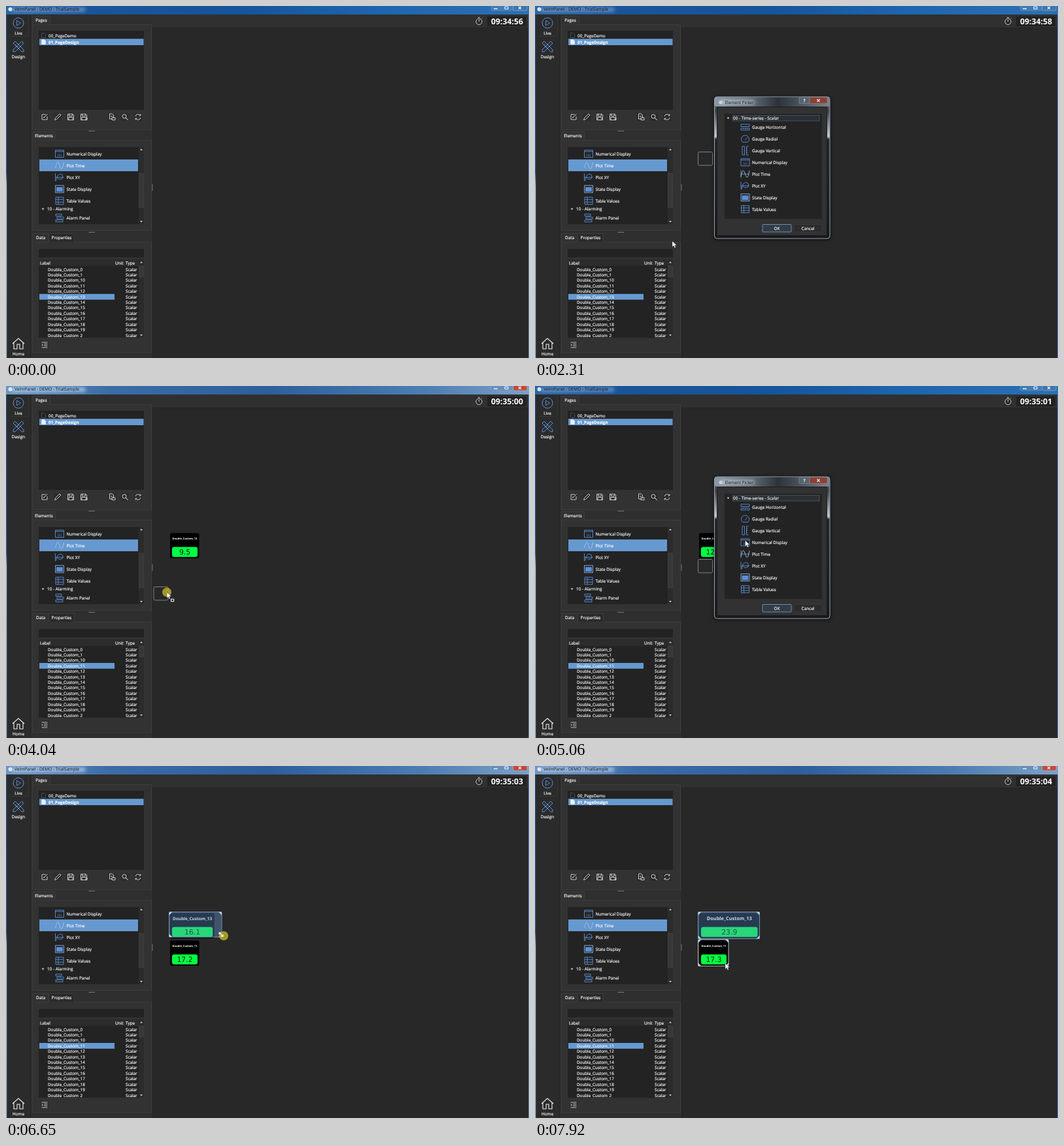
Animation of 800 by 539 pixels, one loop 7990 ms. Source, as an HTML page:

```html
<!DOCTYPE html>
<html lang="en">
<head>
<meta charset="utf-8">
<title>Dashboard designer</title>
<style>
  html, body { margin: 0; width: 100%; height: 100%; overflow: hidden; background: #282828; }
  svg { display: block; width: 800px; height: 539px; text-rendering: geometricPrecision; }
  text {
    font-family: "Open Sans", "Noto Sans", sans-serif; font-size: 6.4px; white-space: pre;
    fill: #fff; stroke: #fff; stroke-width: .16px;
  }
  .plain { stroke: none; }
  .value { font-family: "DejaVu Sans", sans-serif; font-size: 10.8px; fill: #0a1a0c; stroke: none; }
</style>
</head>
<body>
<svg id="stage" viewBox="0 0 800 539"></svg>
<script>
const LOOP = 7990;
const BLUE = '#6699d0', LINE = '#5c8fd6', LIST = '#232323', PANEL = '#323232', EDGE = '#3c3c3c';

// ---- drawing helpers ----
const rect = (x, y, w, h, fill, more = '') =>
  `<rect x="${x}" y="${y}" width="${w}" height="${h}" fill="${fill}" ${more}/>`;
const text = (x, y, s, more = '') => `<text x="${x}" y="${y}" ${more}>${s}</text>`;
const mid = (x, y, s, more = '') => text(x, y, s, 'text-anchor="middle" ' + more);
const path = (d, stroke = LINE, w = .9, fill = 'none') =>
  `<path d="${d}" fill="${fill}" stroke="${stroke}" stroke-width="${w}"/>`;
const at = (x, y, s) => `<g transform="translate(${x} ${y})">${s}</g>`;
const grad = (id, dir, ...stops) =>
  `<linearGradient id="${id}" x1="0" y1="0" x2="${dir === 'h' ? 1 : 0}" y2="${dir === 'h' ? 0 : 1}">` +
  stops.map(([o, c]) => `<stop offset="${o}" stop-color="${c}"/>`).join('') + '</linearGradient>';

const icons = {
  num: path('M-6.5-5.5h13v11h-13zM-6.5-3.5h13') +
    mid(0, 3.5, '(x)', `class="plain" style="font-size:5.5px;fill:${LINE}"`),
  time: path('M-6.5-6v12M-6.5 0h13') + path('M-6.5 4C-4-9-2-6 0 0S4 9 6.5-5', '#a9c4e6'),
  xy: path('M-6.5-6v12M-6.5 0h13') + path('M-5 5C-5-1-2-5 1-5A4 4 0 0 1 1 3C-1 3-3 2-3 0'),
  state: path('M-6.5-5.5h13v11h-13z', '#8db4e4') + rect(-5, -3, 10, 7, LINE),
  table: path('M-6-5.5h12v11h-12zM-6-2h12M-6 2h12M-2-5.5v11'),
  alarm: path('M-6-6h9v3h-9zM-4-1.5h10v3h-10zM-6 3h11v3h-11z'),
  gaugeH: path('M-6.5-4.5h13v3.5h-13zM-6.5 1.5h13v3h-13zM-3 1.5v1.5M0 1.5v1.5M3 1.5v1.5'),
  gaugeR: path('M-4 5A6 6 0 1 1 4 5zM0 2L3-2'),
  gaugeV: path('M-4.5-6.5h3.5v13h-3.5zM5-6.5h-3v13h3M2-3h1.5M2 0h1.5M2 3h1.5')
};
const item = (kind, x, y, label) => at(x, y, icons[kind]) + text(x + 10.5, y + 2.4, label);

const tab = (x, y, w, label, on = true) =>
  path(`M${x} ${y + 13.5}v-13h${w}v13`, EDGE, 1, on ? PANEL : '#2a2a2a') + mid(x + w / 2, y + 9.3, label);
const scroll = (y, h, ty, th) =>
  rect(203, y, 8, h, '#2b2b2b') + rect(203.5, ty, 7, th, '#383838', 'stroke="#484848" stroke-width=".6"') +
  path(`M205 ${y + 5}l2-2.4 2 2.4zM205 ${y + h - 5}l2 2.4 2-2.4z`, 'none', 0, '#c8c8c8');
const tool = (x, y, d) =>
  rect(x - 7, y - 7, 14, 14, '#2c2c2c', `rx="1.5" stroke="${EDGE}" stroke-width=".7"`) +
  at(x, y, path(d, '#dedede'));

// ---- main window ----
const titleBar = (fill, close, alpha) =>
  rect(0, 0, 800, 13, `url(#${fill})`) +
  rect(8, 2, 114, 7, '#d5e6f7', `rx="4" opacity="${alpha}" filter="url(#glow)"`) +
  rect(742, -2, 34, 9, '#5f8ab8', 'rx="2" opacity=".5" stroke="#a9c4de" stroke-width=".5"') +
  rect(776, -2, 21, 9, close, 'rx="2" stroke="#a9c4de" stroke-width=".5"') +
  path('M746 4.2h6', '#fff', 1.3) + path('M763 1.2h5v3.4h-5z', '#fff', 1) +
  path('M784 .8l4 4m0-4l-4 4', '#fff', 1.2);

const names = ['0', '1', '10', '11', '12', '13', '14', '15', '16', '17', '18', '19', '2'];
const rowY = i => 403 + i * 8.42;

function windowArt() {
  let s = rect(0, 13, 800, 526, '#282828') + rect(0, 13, 800, 20, '#303030') +
    rect(0, 13, 38, 526, '#2b2b2b') + rect(38, 13, 186, 526, '#2f2f2f') +
    path('M37.5 13v526M224.5 33.5v506M224.5 33.5H800', '#242424', 1) + path('M5 46.5h29M34.5 14v32', '#383838', .8);

  s += `<circle cx="19" cy="26" r="8" fill="none" stroke="${LINE}"/>` + path('M16.5 22.2v7.6l6-3.8z') +
    mid(19, 43.6, 'Live') +
    at(19, 62, path('M-8-5l3-3L8 5l0 3-3 0zM5-8l3 3L-5 8h-3v-3zM-5-2l1.5-1.5M-2 1L-.5-.5', LINE, 1)) +
    mid(19, 79.6, 'Design') +
    at(19, 517, path('M-9 0L0-8l9 8M-7-1.5V8h5V1h4v7h5v-9.5', '#f0f0f0', 1.1)) + mid(19, 535.2, 'Home');

  s += rect(716, 16, 15, 15, '#2c2c2c', `rx="1.5" stroke="${EDGE}" stroke-width=".7"`) +
    at(723.5, 24, '<circle r="4.6" fill="none" stroke="#dedede" stroke-width=".9"/>' +
      path('M0-3V0M-1.5-6.3h3M3.5-4.5l1.2-1.2', '#dedede')) +
    rect(736, 16, 60, 15, '#222', 'rx="1"');

  s += rect(40.5, 28.5, 182, 161, PANEL, `stroke="${EDGE}"`) + tab(40.5, 15, 27, 'Pages') +
    rect(50, 38, 161, 121, LIST) + rect(51, 50.2, 159.5, 9.8, BLUE) +
    path('M54.5 41.5h4l2 2v5h-6z', '#46566a', .8) + path('M54.5 51.5h4l2 2v5h-6z', '#fff', .5, '#e8f0fa') +
    text(65, 47.5, '00_PageDemo') + text(65, 57.6, '01_PageDesign', 'font-weight="700"');
  const disk = 'M-4.5-4.5h8l1 1v8h-9zM-2.5-4.5v3h5v-3M-3 4.5v-4h6v4';
  s += tool(59, 170, 'M2-4h-6v8h8v-5M-1 1L4.5-4.5M-1.5 1.5l.5-2') +
    tool(79, 170, 'M-4.5 4.5l1-3L3-5l2 2-6.5 6.5z') + tool(99, 170, disk) +
    tool(119, 170, disk + 'M1 4.5h4v-4') +
    tool(162, 170, 'M-3.5-5h4l2 2v5M-3.5-5v8h4M0 1h5v3.5h-5zM-2-1h3') +
    tool(182, 170, 'M-4-1a3 3 0 1 1 6 0a3 3 0 1 1-6 0M1 1.2L4.5 4.7M1.3 1.5L4.7 4.4') +
    tool(202, 170, 'M-4-1A4.2 4.2 0 0 1 3.6-2.4M4-4.5v2.4h-2.4M4 1A4.2 4.2 0 0 1-3.6 2.4M-4 4.5v-2.4h2.4') +
    path('M126.5 191.5h9.5M126.5 346.5h9.5M224 273v10', '#777', 1);

  s += rect(40.5, 205.5, 182, 138, PANEL, `stroke="${EDGE}"`) + tab(40.5, 192, 35, 'Elements') +
    rect(50, 216, 161, 118, LIST) + rect(51, 235, 151, 18, BLUE) + scroll(216, 118, 256, 53);
  [['num', 'Numerical Display'], ['time', 'Plot Time'], ['xy', 'Plot XY'], ['state', 'State Display'],
    ['table', 'Table Values']].forEach(([k, label], i) => s += item(k, 82, 226.3 + i * 18, label));
  s += path('M54.5 309.8h4l-2 2.6z', 'none', 0, '#ccc') + text(63, 313.4, '10 - Alarming') +
    item('alarm', 82, 324.6, 'Alarm Panel');

  s += rect(40.5, 361.5, 182, 169, PANEL, `stroke="${EDGE}"`) + tab(40.5, 348, 25, 'Data') +
    tab(65.5, 348, 39, 'Properties', false) + rect(50, 372, 161, 13, LIST, 'rx="1"') +
    rect(50, 388.5, 161, 119.5, LIST) + rect(50, 388.5, 153, 9.5, '#2c2c2c') +
    text(52, 396, 'Label') + text(167, 396, 'Unit') + text(183, 396, 'Type') + scroll(388.5, 119.5, 398, 17) +
    rect(51, 0, 115, 8.8, BLUE, 'id="pick"') + '<g clip-path="url(#rows)">' +
    names.map((n, i) => text(64, rowY(i) + 2.5, 'Double_Custom_' + n, 'style="font-size:6.3px"') +
      text(183, rowY(i) + 2.5, 'Scalar', 'style="font-size:6.3px"')).join('') + '</g>' +
    tool(59, 519, 'M-4.5-4h9M-1-1.3h5.5M-1 1.3h5.5M-4.5 4h9M-4.5-1.5l2 1.5-2 1.5');
  return s;
}

// ---- element picker ----
function dialogArt() {
  let s = rect(273, 138, 180, 221, '#000', 'rx="5" opacity=".45" filter="url(#glow)"') +
    rect(274.5, 139, 176.5, 217, 'url(#glass)', 'rx="4" stroke="#9aa5b0" stroke-width="1"') +
    rect(275, 139.5, 175.5, 14.5, 'url(#glassTop)', 'rx="3"') +
    rect(282, 144, 54, 7, '#e4edf5', 'rx="4" opacity=".5" filter="url(#glow)"') +
    '<circle cx="284" cy="147.5" r="2.6" fill="#c8d4e2"/>' +
    text(290.5, 149.8, 'Element Picker', 'class="plain" style="fill:#0c0c10"') +
    rect(404, 139.8, 16, 9.5, '#56626e', 'rx="1.5" stroke="#8f9aa5" stroke-width=".6"') +
    rect(420, 139.8, 27, 9.5, '#8a4036', 'rx="1.5" stroke="#a58a84" stroke-width=".6"') +
    mid(412, 147.2, '?', 'font-weight="700"') + path('M431.5 142.6l4 4m0-4l-4 4', '#fff', 1.3) +
    rect(278.5, 154.5, 168, 197, PANEL, 'stroke="#1c1c1c"') + rect(290, 165, 149, 161, LIST) +
    rect(302.5, 167.5, 132.5, 8.5, '#2b3036', 'stroke="#4a5a6c" stroke-width=".8"') +
    path('M293.5 170.6h4l-2 2.6z', 'none', 0, '#ccc') + text(303, 174.2, '00 - Time-series - Scalar') +
    rect(302, 231, 133, 17, BLUE, 'id="chosen"');
  [['gaugeH', 'Gauge Horizontal'], ['gaugeR', 'Gauge Radial'], ['gaugeV', 'Gauge Vertical'],
    ['num', 'Numerical Display'], ['time', 'Plot Time'], ['xy', 'Plot XY'], ['state', 'State Display'],
    ['table', 'Table Values']].forEach(([k, label], i) => s += item(k, 321.5, 185.5 + i * 17.95, label));
  return s + rect(348, 334.5, 44, 11.5, '#353b42', `rx="1" stroke="${BLUE}" stroke-width=".9"`) +
    mid(370, 342.7, 'OK') + rect(396, 334.5, 43, 11.5, '#2c2c2c', `rx="1" stroke="${EDGE}" stroke-width=".8"`) +
    mid(417.5, 342.7, 'Cancel');
}

const stage = document.getElementById('stage');
stage.innerHTML = '<defs>' +
  grad('idle', 'h', [0, '#2d66a6'], [.16, '#1a5499'], [.45, '#15559b'], [.7, '#1d65ae'], [1, '#2b70b4']) +
  grad('live', 'h', [0, '#6d97c4'], [.2, '#3a6ca6'], [.5, '#2d5f9c'], [.8, '#4c7db2'], [1, '#7ba0c8']) +
  grad('side', 'v', [0, '#1b5190'], [.46, '#2a67a8'], [.5, '#a0d2ec'], [1, '#8cc2e2']) +
  grad('glass', 'v', [0, '#6c7884'], [.1, '#3c444c'], [.28, '#c5ced6'], [.3, '#23282d'], [1, '#16191c']) +
  grad('glassTop', 'h', [0, '#8b98a5'], [.35, '#5a656f'], [.55, '#2c3238'], [.75, '#4a555f'], [1, '#77838f']) +
  '<filter id="glow" x="-20%" y="-80%" width="140%" height="260%"><feGaussianBlur stdDeviation="2.4"/></filter>' +
  '<clipPath id="rows"><rect x="50" y="388" width="153" height="119"/></clipPath></defs>' +
  windowArt() + titleBar('idle', '#3f74ad', .35) +
  `<g id="active">${titleBar('live', '#c04a3a', .6)}</g>` +
  '<circle cx="6.5" cy="5" r="3" fill="#dbe8f4"/>' +
  text(13, 7.4, 'VelmPanel - DEMO - TrialSample', 'class="plain" style="fill:#0a1420;font-size:6.6px"') +
  rect(0, 13, 1.2, 526, 'url(#side)') + rect(799, 13, 1, 526, '#3f78b0') +
  text(742, 28, '', 'id="clock" class="plain" font-weight="700" style="font-size:12.25px"') +
  `<g id="tiles"></g><g id="dialog">${dialogArt()}</g><g id="pointer"></g>`;
const [active, pick, clock, tiles, dialog, chosen, pointer] =
  ['active', 'pick', 'clock', 'tiles', 'dialog', 'chosen', 'pointer'].map(id => document.getElementById(id));

// ---- timeline ----
const track = [
  [130, 650, 536], [260, 325, 437], [400, 325, 437], [760, 112, 445], [980, 112, 445], [1120, 140, 424],
  [1220, 180, 370], [1320, 236, 270], [1500, 260, 235], [1860, 261, 234], [2310, 210, 360], [2660, 207, 366],
  [2950, 322, 237], [3180, 322, 237], [3490, 108, 428], [3660, 106, 428], [3800, 128, 412], [4040, 246, 316],
  [4250, 258, 276], [4640, 258, 276], [5060, 321.5, 236.5], [5420, 322, 237], [5900, 298, 263],
  [6200, 298, 263], [6650, 333, 260], [6780, 338, 261], [6950, 346, 263], [7200, 346, 263],
  [7660, 300, 306], [7800, 291, 302], [7990, 291, 302]];
const drags = [{ down: 840, up: 1600, open: 1920, close: 3160 }, { down: 3580, up: 4260, open: 4440, close: 5360 }];
const clicks = [[2980, 3040], [3100, 3160], [5200, 5260], [5310, 5360]];
const resize = { down: 6150, up: 7050 };
const value1 = [[3160, 8.4], [3700, 9.5], [4300, 10.9], [4820, 12.3], [5300, 13.4], [5800, 14.7], [6300, 16.1],
  [6780, 18.2], [7300, 21], [7720, 23.9]];
const value2 = [[5360, 16.6], [5800, 16.9], [6300, 17.2], [6780, 17.5], [7300, 17.4], [7720, 17.3]];

const inside = (t, a, b) => t >= a && t < b;
const clamp = v => Math.max(0, Math.min(1, v));
const latest = (table, t) => table.filter(r => r[0] <= t).pop()[1].toFixed(1);
function where(t) {
  const i = track.findIndex(p => p[0] > t);
  if (i < 1) return track[i < 0 ? track.length - 1 : 0].slice(1);
  const [t0, x0, y0] = track[i - 1], [t1, x1, y1] = track[i], k = (t - t0) / (t1 - t0);
  return [x0 + (x1 - x0) * k, y0 + (y1 - y0) * k];
}

// right edge of the first tile; it snaps to the grid on release
const edge = t => t < 6200 ? 296 : t < resize.up ? where(t)[0] - 3 : 343.5;

function corners(x, y, r, b) {
  return path(`M${x} ${y}h5l-5 5zM${r} ${y}v5l-5-5zM${x} ${b}v-5l5 5zM${r} ${b}h-5l5-5z`, 'none', 0, '#b9d0e8');
}
function tile(y, right, name, value) {
  const w = right - 257, cx = 254 + w / 2, size = Math.min(7.4, w * .104);
  return rect(251, y, w + 5.5, 38.5, '#000', 'rx="2"') +
    mid(cx, y + 8 + size * .35, name, `class="plain" font-weight="700" style="font-size:${size}px"`) +
    rect(254, y + 21.3, w, 15.2, '#00ff44', 'rx="3"') + mid(cx, y + 33, value, 'class="value"');
}

function drawTiles(t) {
  let s = '';
  if (t >= 3160) {
    s += tile(225.3, edge(t - 140), 'Double_Custom_13', latest(value1, t));
    const r = edge(t), b = inside(t, 6200, resize.up) ? where(t)[1] + 2 : 264.5;
    const box = fill => rect(249.5, 223.5, r - 249.5, b - 223.5, fill, 'rx="2" stroke="#7fa6cc" stroke-width=".8"');
    if (t >= resize.down) s += box('rgba(102,153,208,.38)') + corners(249.5, 223.5, r, b);
    else if (t >= 5860) s += box('none') + corners(249.5, 223.5, r, b);
  }
  if (t >= 5360) {
    s += tile(267.2, 296, 'Double_Custom_11', latest(value2, t));
    if (t >= 7560) s += rect(249.5, 265.7, 46.5, 40.6, 'none', 'rx="2" stroke="#d8d8d8" stroke-width=".8"') +
      corners(249.5, 265.7, 296, 306.3);
  }
  for (const d of drags) {
    const [x, y] = where(Math.min(t, d.up));
    if (!inside(t, d.down, d.close) || x < 225) continue;
    s += rect(226 + 23.5 * Math.floor((x - 225) / 23.5), 223.5 + 21 * Math.floor((y - 223) / 21), 22, 20.5,
      'none', 'rx="2" stroke="#8c8c8c" stroke-width=".9"');
  }
  return s;
}

function drawPointer(t) {
  if (t < 130) return '';
  const [x, y] = where(t), drag = drags.some(d => inside(t, d.down + 150, d.up));
  const down = drags.some(d => inside(t, d.down, d.up)) || inside(t, resize.down, resize.up) ||
    clicks.some(c => inside(t, ...c));
  let s = down ? '<circle r="7" fill="#b8ad26" opacity=".85"/>' : '';
  s += inside(t, 5880, 7250)
    ? at(-4, -2, path('M-2.5-2.5l5 5M-3 0v-3h3M3 0v3h-3', '#fff', 1.1))
    : path('M0 0v9l2.2-2 1.5 3.4 1.6-.7-1.5-3.3h3z', '#222', .4, '#fff');
  if (drag) s += rect(6.5, 10.5, 4, 3.5, '#222', 'stroke="#fff" stroke-width="1"');
  return at(x, y, s);
}

function draw(now) {
  const t = now % LOOP;
  const sec = 56 + Math.floor((t + 480) / 1000);
  clock.textContent = sec < 60 ? '09:34:' + sec : '09:35:0' + (sec - 60);
  pick.setAttribute('y', rowY(t < drags[1].down ? 5 : 3) - 4.2);

  let shown = 0;
  for (const d of drags) shown = Math.max(shown, Math.min(clamp((t - d.open) / 180), clamp((d.close + 120 - t) / 120)));
  const k = .94 + .06 * shown;
  dialog.setAttribute('opacity', shown);
  dialog.setAttribute('transform', `translate(${363 * (1 - k)} ${247.5 * (1 - k)}) scale(${k})`);
  chosen.setAttribute('opacity', inside(t, 2980, 3300) || inside(t, 5200, 5500) ? 1 : 0);
  const idle = t < 840 || drags.some(d => inside(t, d.open, d.close));
  active.setAttribute('opacity', idle ? 0 : 1);

  tiles.innerHTML = drawTiles(t);
  pointer.innerHTML = drawPointer(t);
}
function loop() {
  draw(performance.now());
  requestAnimationFrame(loop);
}
loop();
</script>
</body>
</html>
```
